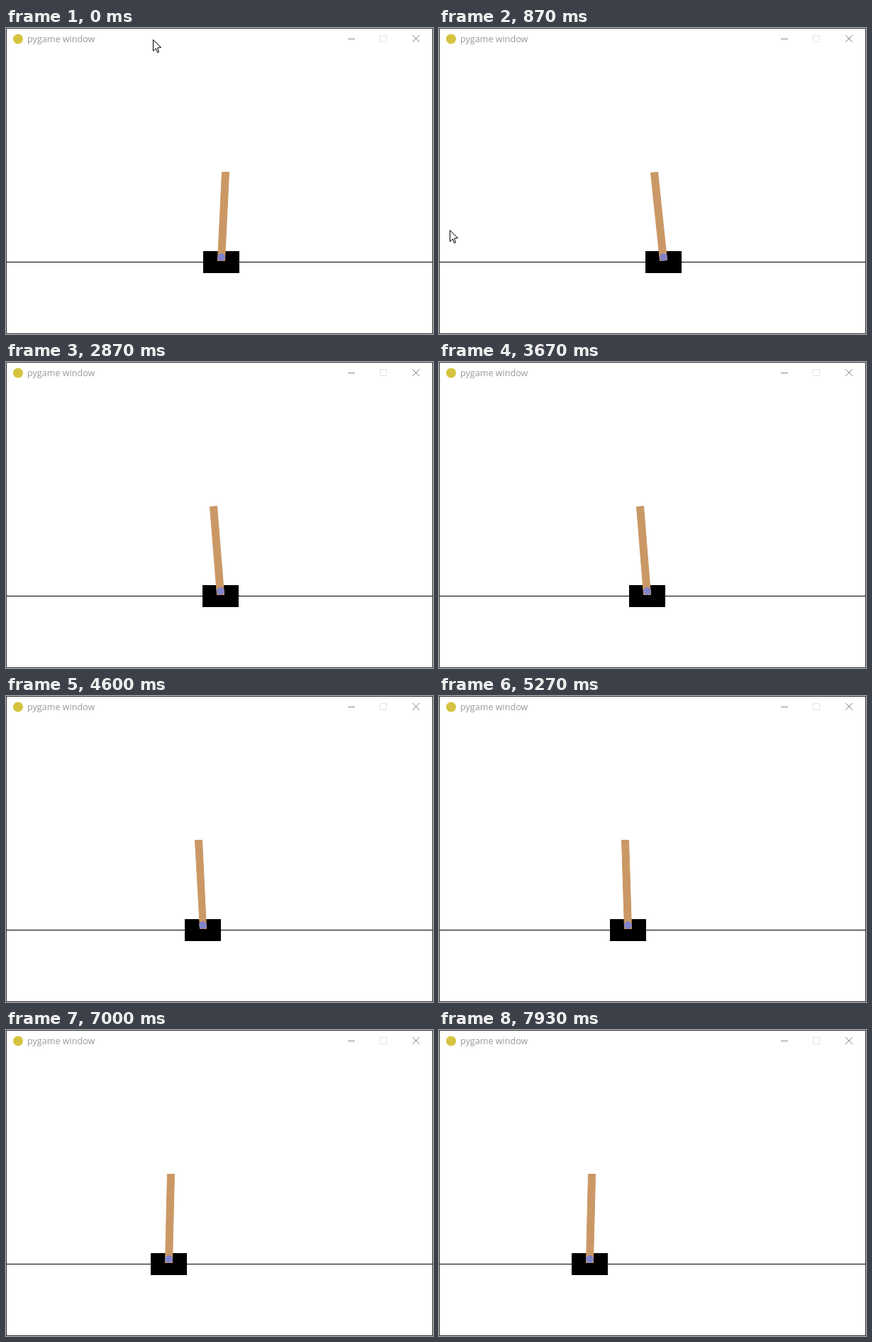
Recreate the animation shown at these times as an HTML page with a canvas. Size 602 by 432 pixels, loop 8 s.

```html
<!DOCTYPE html>
<html lang="en">
<head>
<meta charset="utf-8">
<title>pygame window</title>
<style>
  html, body { margin: 0; width: 100%; height: 100%; overflow: hidden; background: #fff; }
  #stage { position: relative; width: 602px; height: 432px; overflow: hidden; }
  canvas { position: absolute; left: 0; top: 0; display: block; }
  #title {
    position: absolute; left: 30px; top: 6px; line-height: 19px; white-space: pre;
    font-family: "Open Sans", "Noto Sans", sans-serif; font-size: 12.6px; color: #999;
  }
</style>
</head>
<body>
<div id="stage">
  <canvas id="view" width="602" height="432"></canvas>
  <div id="title">pygame window</div>
</div>
<script>
const ctx = document.getElementById('view').getContext('2d');
const LOOP = 8000;

// Key points [ms, px] of the cart's left edge
const CART = [
  [0, 278.5], [1130, 293.05], [1930, 285.8], [3670, 268.5],
  [5130, 242.5], [6130, 221.4], [7930, 187.5]
];

// A point this far up the pole glides smoothly; the angle follows from it and the cart
const ARM = 83;
const GLIDE = [
  [0, 307.65], [1130, 307.2], [1930, 303.9], [3670, 286.6],
  [4600, 273.6], [5870, 251.7], [7930, 214.6]
];

const MOUSE = { from: 330, to: 1070, end: 1130 };

function slope(pts, i) {
  const a = pts[Math.max(i - 1, 0)], b = pts[Math.min(i + 1, pts.length - 1)];
  return (b[1] - a[1]) / (b[0] - a[0]);
}

function spline(pts, t) {
  let i = 0;
  while (i < pts.length - 2 && t >= pts[i + 1][0]) i++;
  const [t0, a] = pts[i], [t1, b] = pts[i + 1];
  const d = t1 - t0, u = (t - t0) / d, v = 1 - u;
  return a * v * v * (1 + 2 * u) + b * u * u * (3 - 2 * u)
    + d * u * v * (slope(pts, i) * v - slope(pts, i + 1) * u);
}

// Ticks come 15 times a second, rounded down to 10 ms
function tickAt(t) {
  const r = t % 200;
  return 3 * Math.floor(t / 200) + (r >= 130 ? 2 : r >= 70 ? 1 : 0);
}

const tickTime = k => 200 * Math.floor(k / 3) + [0, 70, 130][k % 3];

// The simulation skips about every third tick, with a slow drift
const held = k => (k + Math.floor(k / 16)) % 3 === 2;

function rect(color, x, y, w, h) {
  ctx.fillStyle = color;
  ctx.fillRect(x, y, w, h);
}

function disc(color, x, y, r) {
  ctx.fillStyle = color;
  ctx.beginPath();
  ctx.arc(x, y, r, 0, 2 * Math.PI);
  ctx.fill();
}

function shape(pts, fill, stroke, join) {
  ctx.beginPath();
  for (const [x, y] of pts) ctx.lineTo(x + 0.5, y + 0.5);
  ctx.closePath();
  ctx.fillStyle = fill;
  ctx.strokeStyle = stroke;
  ctx.lineJoin = join;
  ctx.fill();
  ctx.stroke();
}

function drawWindow() {
  rect('#fff', 0, 0, 602, 432);
  ctx.lineWidth = 1;
  ctx.lineJoin = 'miter';
  ctx.strokeStyle = '#333';
  ctx.strokeRect(0.5, 0.5, 601, 431);
  disc('#d6c440', 17, 15.5, 7);
  rect('#8c8c8c', 482, 15, 10, 1);
  ctx.strokeStyle = '#e4e4e4';
  ctx.strokeRect(527.5, 10.5, 9, 9);
  ctx.strokeStyle = '#8c8c8c';
  ctx.beginPath();
  ctx.moveTo(573, 10); ctx.lineTo(583, 20);
  ctx.moveTo(583, 10); ctx.lineTo(573, 20);
  ctx.stroke();
}

function drawCartPole(t) {
  const centre = spline(CART, t) + 25, mid = Math.floor(centre);
  const angle = (spline(GLIDE, t) - centre) / ARM;
  const s = Math.sin(angle), c = Math.cos(angle);
  const corner = ([x, y]) => [
    Math.floor(centre + x * c + y * s),
    430 - Math.floor(107.5 + y * c - x * s)
  ];
  rect('#000', mid - 25, 315, 51, 31);
  shape([[-5, -5], [-5, 120], [5, 120], [5, -5]].map(corner), '#ca9865', '#ca9865', 'miter');
  disc('#8184cb', mid + 0.5, 323.5, 5.4);
  rect('#000', 1, 330, 600, 1);
}

// The pointer sweeps down the window along a parabola, then vanishes
function drawMouse(t) {
  if (t >= MOUSE.end) return;
  const u = Math.min(1, Math.max(0, (t - MOUSE.from) / (MOUSE.to - MOUSE.from)));
  const x = Math.round(15 + 336 * (u - 0.756) ** 2), y = Math.round(16 + 368 * u);
  const arrow = [[0, 0], [0, 16], [3.7, 12.5], [6, 18], [8, 17.5], [6, 11.5], [11, 11]];
  shape(arrow.map(([a, b]) => [x + a, y + b]), '#fff', '#000', 'bevel');
}

function draw(t) {
  const now = tickAt(t);
  drawWindow();
  drawCartPole(tickTime(held(now) ? now - 1 : now));
  drawMouse(tickTime(now));
}

const start = performance.now();
function loop() {
  draw((performance.now() - start) % LOOP);
  requestAnimationFrame(loop);
}
loop();
</script>
</body>
</html>
```
